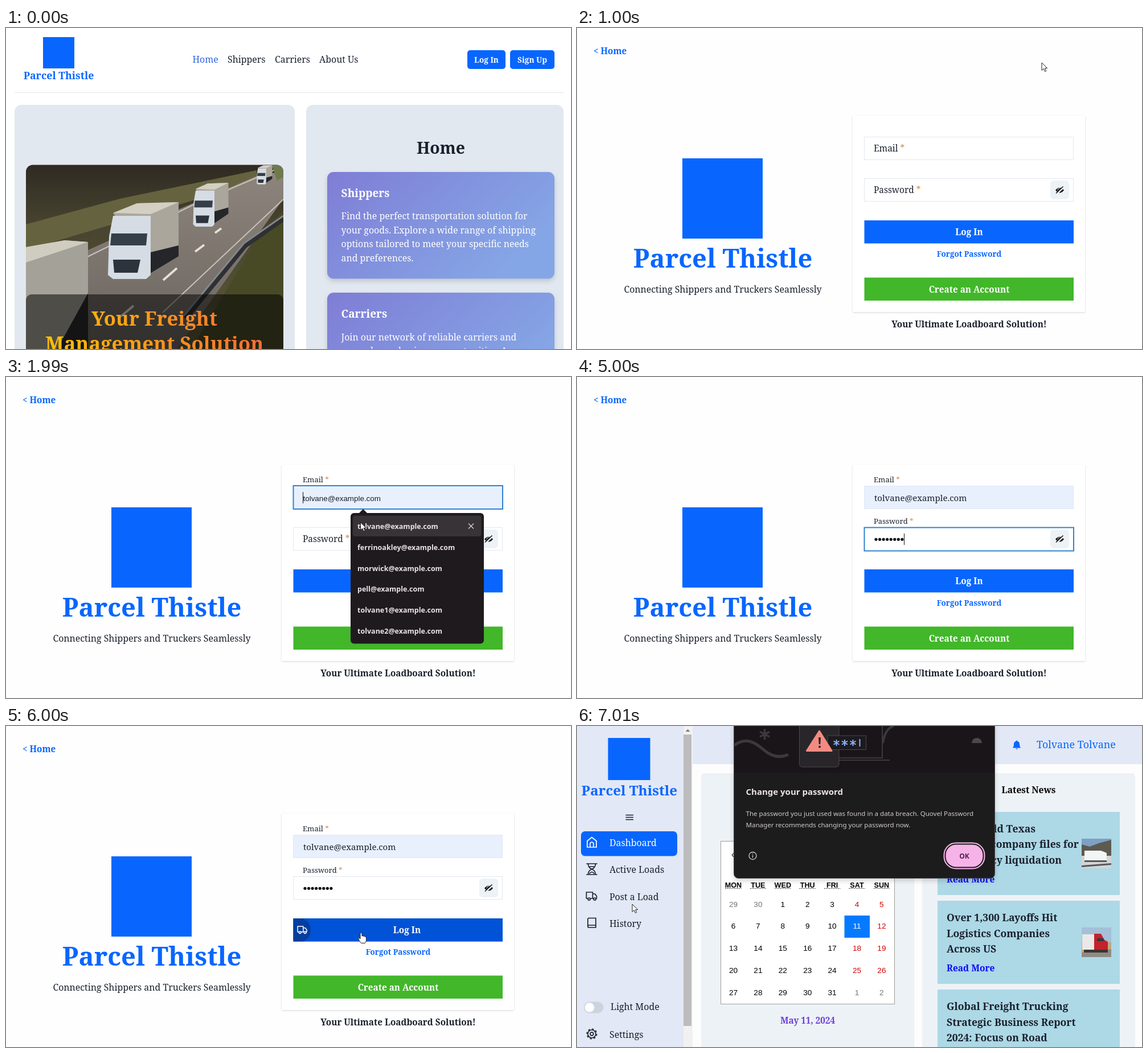
These frames come from a looping animation (992x564 px, 8000 ms). An HTML page:

```html
<!DOCTYPE html>
<html lang="en">
<head>
<meta charset="utf-8">
<title>Freight login</title>
<style>
html, body { margin: 0; width: 100%; height: 100%; overflow: hidden; background: #fff; }
svg { display: block; width: 992px; height: 564px; }
text { font: 15.9px "Noto Serif", serif; fill: #1a202c; white-space: pre; }
.b { font-weight: 600; }
.m { text-anchor: middle; }
.e { text-anchor: end; }
.w text, text.w { fill: #fff; }
.small { font-size: 13px; }
.blue { fill: #0866ff; }
.star { fill: #d08a4a; }
.hero text { font-size: 34.6px; font-weight: 600; fill: url(#gold); }
.title { font-size: 19px; font-weight: 600; }
.action { font-size: 15.3px; font-weight: 600; }
.sans, .sans text { font-family: "Noto Sans", "Open Sans", sans-serif; }
.arial, .arial text { font-family: "Liberation Sans", Arial, sans-serif; }
.news text { font-size: 17.6px; font-weight: 600; }
.news .more { font-size: 15.5px; fill: #0a0aff; }
.line { fill: none; stroke: #1a202c; stroke-width: 1.7; stroke-linejoin: round; stroke-linecap: round; }
.field { fill: #fff; stroke: #e2e8f0; }
.focus { stroke: #3182ce; stroke-width: 2; }
.filled { fill: #e8f0fe; }
.caret { stroke: #111; fill: none; }
</style>
</head>
<body>
<svg viewBox="0 0 992 564">
<defs>
  <linearGradient id="card" x2="1" y2=".5"><stop stop-color="#7f7dd5"/><stop offset="1" stop-color="#85a6e6"/></linearGradient>
  <linearGradient id="gold" gradientUnits="userSpaceOnUse" x1="60" x2="465"><stop stop-color="#ffc400"/><stop offset="1" stop-color="#f3693a"/></linearGradient>
  <linearGradient id="trees" x2="0" y2="1"><stop stop-color="#2e2a22"/><stop offset=".3" stop-color="#47432f"/><stop offset="1" stop-color="#5d5c3c"/></linearGradient>
  <linearGradient id="road" x2="0" y2="1"><stop stop-color="#8d857c"/><stop offset="1" stop-color="#6a645f"/></linearGradient>
  <filter id="shadow" x="-10%" y="-10%" width="120%" height="125%"><feDropShadow dx="0" dy="4" stdDeviation="4" flood-opacity=".16"/></filter>
  <filter id="soft" x="-5%" y="-5%" width="110%" height="110%"><feDropShadow dx="0" dy="1" stdDeviation="1.5" flood-opacity=".16"/></filter>
  <clipPath id="photo"><rect x="35" y="240.5" width="452" height="340" rx="12"/></clipPath>
  <clipPath id="btn"><rect x="504.5" y="338" width="367.5" height="40.5"/></clipPath>
  <path id="arrow" d="M0 0V13.5L3.2 10.5L5.5 15.5L7.7 14.5L5.5 9.7H9.7Z" fill="#fff" stroke="#222"/>
  <g id="van" fill="none" stroke-width="1.7" stroke-linejoin="round">
    <path d="M2.5 11H0V0H11V11H7M11 3H15L18 7V11H17M11 11H12.5"/>
    <circle cx="4.7" cy="12" r="2"/><circle cx="14.7" cy="12" r="2"/>
  </g>
  <g id="lorry">
    <path d="M10 19L52 2L125 0V93L75 118Z" fill="#aaa69c"/>
    <path d="M10 19L52 2L125 0L76 21Z" fill="#d3cfc3"/>
    <path d="M76 88L125 76V95L70 128Z" fill="#25262a"/>
    <path d="M10 24H76V128L68 135H10L1 128L3 60Z" fill="#d5dce3"/>
    <path d="M7 55H70L68 76H5Z" fill="#363f49"/>
    <path d="M10 101H58L53 124H12Z" fill="#2c333c"/>
  </g>
</defs>

<g data-t="0 1000">
  <rect x="65" y="16" width="55" height="55" class="blue"/>
  <text x="92.5" y="90" class="b m blue" style="font-size:17.8px">Parcel Thistle</text>
  <text x="327.5" y="61" style="fill:#3167e0">Home</text><text x="389" y="61">Shippers</text>
  <text x="472" y="61">Carriers</text><text x="550" y="61">About Us</text>
  <g class="blue"><rect x="810" y="39" width="67" height="33" rx="5"/><rect x="885" y="39" width="78" height="33" rx="5"/></g>
  <text x="843.5" y="61" class="b m w" style="font-size:13.6px">Log In</text>
  <text x="924" y="61" class="b m w" style="font-size:13.6px">Sign Up</text>
  <path d="M15 113.5H979" stroke="#e5e7eb"/>
  <g fill="#e2e8f0"><rect x="15" y="135" width="492" height="450" rx="12"/><rect x="527" y="135" width="452" height="450" rx="12"/></g>

  <g clip-path="url(#photo)">
    <path d="M35 240H487V580H35Z" fill="url(#trees)"/>
    <path d="M35 345L200 300L440 250V270L35 390Z" fill="#65633f"/>
    <path d="M35 410L140 392L300 320L445 258L487 252V300L300 564H35Z" fill="url(#road)"/>
    <path d="M466 240H487V262L476 268Z" fill="#6f7a4c"/>
    <path d="M487 320L440 372L325 564H487Z" fill="#484a26"/>
    <path d="M487 301L275 500M143 402L330 310L470 250" fill="none" stroke="#c9c3ba" stroke-width="2"/>
    <path d="M300 422L276 443M348 381L332 393M378 352L367 360M224 488L200 508" stroke="#e4e0d9" stroke-width="4"/>
    <path d="M487 335L420 382L315 510" fill="none" stroke="#2e3033" stroke-width="9"/>
    <path d="M487 330L418 378L312 506" fill="none" stroke="#85878a" stroke-width="3"/>
    <use href="#lorry" transform="translate(178 306)"/>
    <use href="#lorry" transform="translate(328 272) scale(.5 .57)"/>
    <use href="#lorry" transform="translate(440 241) scale(.22 .25)"/>
    <path d="M35 385L103 373L144 376V490L90 564H35Z" fill="#a3a198"/>
    <path d="M35 385L103 373L144 376L35 412Z" fill="#d0ccc0"/>
    <path d="M144 466L90 564H144Z" fill="#2b2a2a"/>
    <rect x="35" y="468" width="452" height="110" rx="10" fill="#000" fill-opacity=".52"/>
  </g>
  <g class="hero m">
    <text x="260.5" y="523">Your Freight</text>
    <text x="260.5" y="567">Management Solution</text>
  </g>

  <text x="763.5" y="221" class="b m" style="font-size:28.4px">Home</text>
  <g fill="url(#card)" filter="url(#shadow)"><rect x="564" y="253" width="399" height="187.5" rx="11"/><rect x="564" y="465" width="399" height="187.5" rx="11"/></g>
  <g class="w">
    <text x="588.5" y="297" class="title">Shippers</text>
    <text x="588.5" y="336">Find the perfect transportation solution for</text>
    <text x="588.5" y="361">your goods. Explore a wide range of shipping</text>
    <text x="588.5" y="385">options tailored to meet your specific needs</text>
    <text x="588.5" y="410">and preferences.</text>
    <text x="588.5" y="509" class="title">Carriers</text>
    <text x="588.5" y="549">Join our network of reliable carriers and</text>
    <text x="588.5" y="573">expand your business opportunities. As</text>
  </g>
</g>

<g data-t="1000 7010">
  <rect width="992" height="564" fill="#fefefe"/>
  <text x="29" y="46" class="action blue">&lt; Home</text>
  <rect x="185" y="229" width="141" height="141" class="blue"/>
  <text x="256" y="421" class="b m blue" style="font-size:45.2px">Parcel Thistle</text>
  <text x="256" y="465" class="m">Connecting Shippers and Truckers Seamlessly</text>
  <rect x="484" y="154" width="408" height="345" rx="2" fill="#fff" filter="url(#soft)"/>

  <rect x="504.5" y="191.5" width="367" height="40" class="field" data-t="1000 1990"/>
  <rect x="504.5" y="191.5" width="367" height="40" class="field filled" data-t="2990 7010"/>
  <text x="521" y="217" style="font-size:15.4px" data-t="1000 1990">Email <tspan class="star">*</tspan></text>
  <text x="521" y="185" class="small" data-t="1990 7010">Email <tspan class="star">*</tspan></text>
  <g data-t="1990 2990">
    <rect x="504.5" y="191" width="367.5" height="41" class="field filled focus"/>
    <text x="521.5" y="217.5" class="arial" style="font-size:13.4px">tolvane@example.com</text>
    <path d="M521.5 202V222" class="caret"/>
  </g>
  <text x="522" y="218" style="font-size:15px" data-t="2990 7010">tolvane@example.com</text>

  <rect x="504.5" y="264.5" width="367" height="40" class="field"/>
  <rect x="504.5" y="264.5" width="367.5" height="41" class="field focus" data-t="2990 6000"/>
  <text x="521" y="290" style="font-size:15.4px" data-t="1000 2990">Password <tspan class="star">*</tspan></text>
  <text x="521" y="258" class="small" data-t="2990 7010">Password <tspan class="star">*</tspan></text>
  <g id="dots"></g>
  <path d="M522.5 275V295" class="caret" data-t="2990 4010"/>
  <path d="M561.5 275V295" class="caret" data-t="4010 5000"/>
  <path d="M574.5 275V295" class="caret" data-t="5000 6000"/>
  <path d="M607 276.5H613M607 289.5H613M610 276.5V289.5" fill="none" stroke="#222" data-t="2990 5000"/>
  <rect x="831" y="268" width="33" height="33" rx="6" fill="#edf2f7"/>
  <path d="M840 285Q847.5 276 855 285Q847.5 294 840 285Z" fill="#111"/>
  <path d="M843.5 285.5Q845 281 849 280.5" fill="none" stroke="#edf2f7"/>
  <path d="M841.5 291.5L854.5 279.5" stroke="#edf2f7" stroke-width="3.5"/>
  <path d="M841 290.5L853.5 278.5" stroke="#111" stroke-width="1.5"/>

  <rect x="504.5" y="338" width="367.5" height="40.5" class="blue"/>
  <text x="688.5" y="364" class="action m w" data-t="1000 6000">Log In</text>
  <g data-t="6000 7010">
    <g clip-path="url(#btn)"><rect x="504" y="338" width="368" height="41" fill="#0052d6"/><circle cx="513" cy="358.5" r="22" fill="#063e9e"/></g>
    <use href="#van" transform="translate(512 352) scale(.89)" stroke="#fff"/>
    <text x="704" y="364" class="action m w">Log In</text>
  </g>
  <text x="688.5" y="402" class="b m blue" style="font-size:13.5px">Forgot Password</text>
  <rect x="504.5" y="438.5" width="367.5" height="40.5" fill="#42b72a"/>
  <text x="688.5" y="464.5" class="action m w">Create an Account</text>
  <text x="688.5" y="525.5" class="action m">Your Ultimate Loadboard Solution!</text>

  <use href="#arrow" x="816" y="61" data-t="1000 1990"/>
  <g data-t="1990 2990">
    <path d="M619 240L627 232L635 240Z" fill="#1f1a1e"/>
    <rect x="605" y="239" width="234" height="229.5" rx="6" fill="#1f1a1e"/>
    <rect x="609" y="243.5" width="225.5" height="36.5" rx="4" fill="#383337"/>
    <g id="mails" class="sans"></g>
    <path d="M812 257.5L821 266.5M821 257.5L812 266.5" stroke="#d8d0d4" stroke-width="1.3"/>
    <use href="#arrow" x="622.5" y="255.5"/>
  </g>
  <path d="M622 364Q623.5 362.5 625 364V369Q627 368 628 369.5Q630 368.5 630.8 370.5Q632.5 370 632.5 372.5V376Q632.5 379 630.5 381.5H623.5Q620 377.5 618.5 373.5Q619.5 371.5 622 374Z" fill="#fff" stroke="#222" data-t="6000 7010"/>
</g>

<g data-t="7010 8000">
  <rect width="992" height="564" fill="#fdfdfd"/>
  <path d="M0 0H187V564H0ZM203 0H992V67H203Z" fill="#e2e8f5"/>
  <rect x="187" width="16" height="564" fill="#f1f1f1"/>
  <rect x="187" y="15" width="14" height="512" fill="#bcbcbe"/>
  <path d="M190.5 10H198.5L194.5 5.5Z" fill="#7c7c7c"/>

  <rect x="54.5" y="21" width="74" height="74" class="blue"/>
  <text x="92" y="122" class="b m blue" style="font-size:24.2px">Parcel Thistle</text>
  <path d="M86 156.5H98.5M86 160.5H98.5M86 164.5H98.5" class="line" style="stroke-width:1.4"/>
  <rect x="7" y="185" width="169" height="43.5" rx="7" class="blue"/>
  <path d="M18 202L26 195.5L34 202V213H18ZM23 213V206Q26 202 29 206V213" class="line" style="stroke:#fff"/>
  <text x="57" y="211" class="w">Dashboard</text>
  <path d="M17 242H35M17 261H35M19.5 242Q19.5 249 26 251.5Q19.5 254 19.5 261M32.5 242Q32.5 249 26 251.5Q32.5 254 32.5 261M22 259Q26 254 30 259M22.5 247H29.5" class="line"/>
  <text x="57" y="258">Active Loads</text>
  <use href="#van" transform="translate(16.5 292)" stroke="#1a202c"/>
  <text x="57" y="305.5">Post a Load</text>
  <path d="M33 337.5V354H21Q19 354 19 352V339.5Q19 337.5 21 337.5ZM19 351Q19.5 350 21 350H33" class="line"/>
  <text x="57" y="353">History</text>
  <rect x="12" y="484.5" width="34.5" height="20" rx="10" fill="#cbd5e0"/><circle cx="22" cy="494.5" r="8.3" fill="#fff"/>
  <text x="59" y="499">Light Mode</text>
  <g class="line"><circle cx="26" cy="541" r="2.8"/><circle cx="26" cy="541" r="7"/><circle cx="26" cy="541" r="8.7" stroke-dasharray="3.4" stroke-linecap="butt"/></g>
  <text x="57" y="548">Settings</text>
  <use href="#arrow" x="97" y="313"/>

  <path d="M765 38.5Q767 36 767 32Q767 27.5 771 26.5Q772 24 773 26.5Q777 27.5 777 32Q777 36 779 38.5ZM770 39.5H774Q772 42.5 770 39.5Z" class="blue"/>
  <text x="807" y="39" class="blue" style="font-size:17.8px">Tolvane Tolvane</text>
  <g fill="#edf2f7"><rect x="218" y="83" width="374.5" height="500" rx="6"/><rect x="606" y="83" width="374" height="500" rx="6"/></g>

  <rect x="252.5" y="202.5" width="305" height="286" fill="#fff" stroke="#a0a096"/>
  <text x="271" y="231" class="arial">‹</text>
  <rect x="469.5" y="333" width="44.5" height="39" fill="#057aff"/>
  <g id="cal" class="arial m"></g>
  <text x="405" y="523" class="action m" style="fill:#6b40d8">May 11, 2024</text>

  <text x="793" y="117.5" class="b m" style="font-size:15.6px;fill:#000">Latest News</text>
  <path d="M633 151H953V297H633ZM633 307H953V453H633ZM633 463H953V609H633Z" fill="#add8e6"/>
  <g class="news">
    <text x="805" y="187" class="e">Year-Old Texas</text>
    <text x="881" y="214" class="e">trucking company files for</text>
    <text x="851" y="242" class="e">bankruptcy liquidation</text>
    <text x="649" y="275" class="more">Read More</text>
    <text x="649" y="343">Over 1,300 Layoffs Hit</text>
    <text x="649" y="370.5">Logistics Companies</text>
    <text x="649" y="398">Across US</text>
    <text x="649" y="431" class="more">Read More</text>
    <text x="649" y="499">Global Freight Trucking</text>
    <text x="649" y="526.5">Strategic Business Report</text>
    <text x="649" y="554">2024: Focus on Road</text>
  </g>
  <g transform="translate(886 198)">
    <rect width="52" height="52" fill="#7da0c4"/>
    <path d="M0 10L14 14L30 8L52 2V32H0Z" fill="#5d5a50"/>
    <rect y="30" width="52" height="22" fill="#d3d5d6"/>
    <path d="M5 21H34L44 25V38H5Z" fill="#f4f5f5"/><path d="M5 38H44V41H5ZM0 47L52 43V46L0 50Z" fill="#55585c"/>
  </g>
  <g transform="translate(886 354)">
    <rect width="52" height="52" fill="#a5c0d8"/><rect y="26" width="52" height="26" fill="#bda883"/>
    <path d="M0 44L52 38V52H0Z" fill="#8f8a83"/>
    <rect x="1" y="12" width="23" height="27" fill="#e9e9e7"/>
    <path d="M22 11H34L40 22L46 25V41H22Z" fill="#c4222c"/><path d="M27 19H38L40 24H27Z" fill="#333b44"/><path d="M4 39H46V44H4Z" fill="#3b3432"/>
  </g>

  <rect x="275.5" y="-12" width="458" height="279.5" rx="8" fill="#1f1a1e" stroke="#4a464a" filter="url(#shadow)"/>
  <rect x="276" width="457" height="82" fill="#191519"/>
  <g fill="none" stroke="#3c393d">
    <path d="M276 34C298 18 314 30 328 42S356 57 371 50" stroke-width="5"/>
    <path d="M329.5 5V24M321 10L338 19M338 10L321 19" stroke-width="3.5"/>
    <path d="M460 56H536V0M460 60H549" stroke-width="2"/>
    <path d="M537 30Q541 4 556 0" stroke-width="4"/>
    <rect x="390.5" y="-10" width="69.5" height="82" rx="5" fill="#29262a" stroke="#4b484c"/>
    <rect x="440" y="17" width="67.5" height="24.5" fill="#1d1a1f" stroke="#4b484c"/>
  </g>
  <path d="M693 30Q694 21 702 21Q710 21 711 30Z" fill="#4b484c"/>
  <path d="M425.5 9L447 43.5H403.5Z" fill="#f28b82" stroke="#f28b82" stroke-width="3" stroke-linejoin="round"/>
  <path d="M424 20H428L427.3 32H424.7Z" fill="#29262a"/><circle cx="426" cy="36.5" r="2" fill="#29262a"/>
  <path id="stars" fill="none" stroke="#8ab4f8" stroke-width="2"/>
  <g class="sans">
    <text x="296.5" y="121" style="font-size:15px;font-weight:600;fill:#ebe2e7">Change your password</text>
    <text x="296.5" y="158" style="font-size:11.55px;fill:#d3cace">The password you just used was found in a data breach. Quovel Password</text>
    <text x="296.5" y="178" style="font-size:11.55px;fill:#d3cace">Manager recommends changing your password now.</text>
    <circle cx="308.5" cy="228" r="6.5" fill="none" stroke="#d3cace" stroke-width="1.3"/>
    <path d="M308.5 227V231.5M308.5 224.3V225.7" stroke="#d3cace" stroke-width="1.3"/>
    <rect x="644.5" y="205.5" width="71" height="45" rx="21" fill="none" stroke="#f6b9e9" stroke-width="2"/>
    <rect x="647.5" y="208.5" width="65" height="39" rx="18" fill="#f6b3e8"/>
    <text x="680" y="232.5" class="m" style="font-size:12px;font-weight:600;fill:#55204d">OK</text>
  </g>
</g>
</svg>
<script>
const byId = id => document.getElementById(id);
const label = (x, y, s, size, fill, weight = 400) =>
  `<text x="${x}" y="${y}" style="font-size:${size}px;fill:${fill};font-weight:${weight}">${s}</text>`;

// Password bullets: six typed first, then two more
byId('dots').innerHTML = Array.from({ length: 8 }, (_, i) =>
  `<circle cx="${525 + 6.55 * i}" cy="285.3" r="2.6" fill="#111" data-t="${i < 6 ? 4010 : 5000} 7010"/>`).join('');

byId('mails').innerHTML = ['tolvane', 'ferrinoakley', 'morwick', 'pell', 'tolvane1', 'tolvane2']
  .map((name, i) => label(617, 267 + 36.75 * i, name + '@example.com', 12.5, '#ebe2e7', 600)).join('');

byId('stars').setAttribute('d', [455.5, 470, 484.5].map(x =>
  `M${x} 24V35M${x - 5} 26.5L${x + 5} 32.5M${x + 5} 26.5L${x - 5} 32.5`).join('') + 'M496.5 23V36');

// Five weeks starting Monday, April 29
const colX = i => 274.5 + 43.4 * i;
let cal = ['MON', 'TUE', 'WED', 'THU', 'FRI', 'SAT', 'SUN'].map((day, i) =>
  label(colX(i), 284, day, 12.6, '#000', 700) +
  `<path d="M${colX(i) - 14} 285.5h28" stroke="#000" stroke-dasharray="1.5"/>`).join('');
for (let i = 0; i < 35; i++) {
  const n = i - 1, other = n < 1 || n > 31;
  const fill = other ? '#757575' : n === 11 ? '#fff' : i % 7 > 4 ? '#d10000' : '#000';
  cal += label(colX(i % 7), 317.5 + 38.75 * (i / 7 | 0), n < 1 ? n + 30 : n > 31 ? n - 31 : n, 13.6, fill);
}
byId('cal').innerHTML = cal;

const timed = [...document.querySelectorAll('[data-t]')].map(el => [el, ...el.dataset.t.split(' ').map(Number)]);
function draw() {
  const t = performance.now() % 8000;
  for (const [el, from, to] of timed) el.style.display = t >= from && t < to ? '' : 'none';
  requestAnimationFrame(draw);
}
draw();
</script>
</body>
</html>
```
